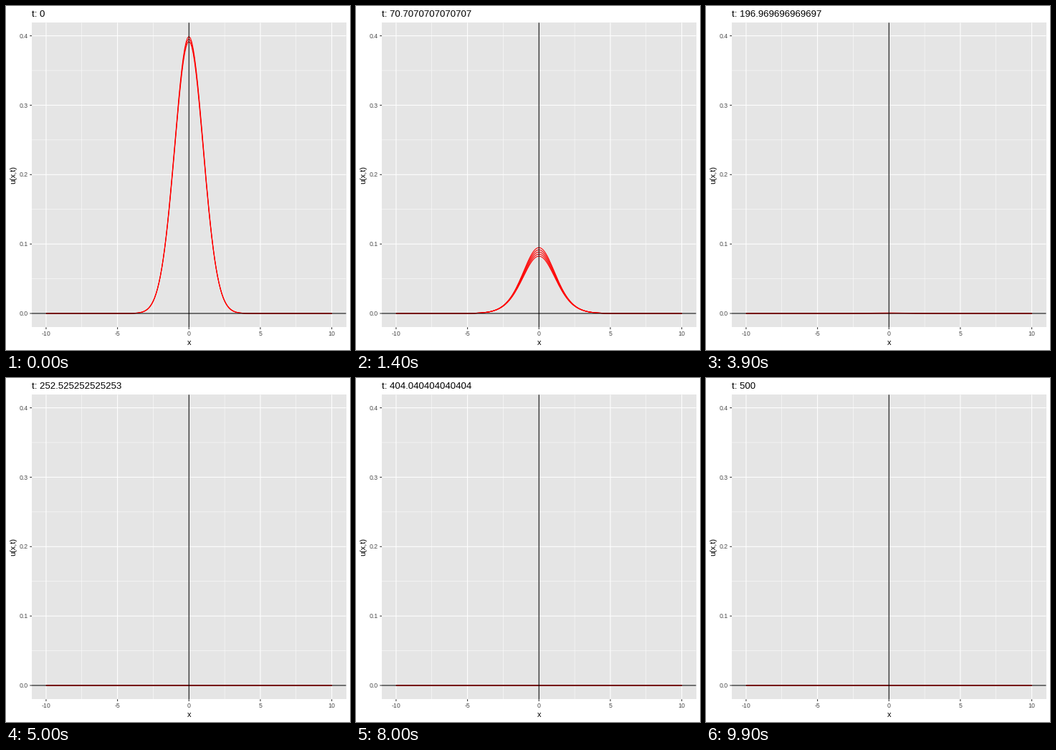
Recreate the animation shown at these times as a matplotlib script. Size 480 by 480 pixels, loop 10 s.

```python
import numpy as np
import matplotlib.pyplot as plt
from matplotlib.animation import FuncAnimation
from matplotlib.patches import Rectangle

plt.rcParams["font.family"] = "Liberation Sans"

SIZE, FRAMES, T_END = 480, 100, 500
PT = 0.75  # points per pixel at 96 dpi
LEFT, RIGHT, TOP, BOTTOM = 36.0, 474.5, 23.3, 448.3

# Bistable reaction-diffusion: u_t = D u_xx + K u (1 - u) (u - A)
D, K, A = 0.01, 0.1, 0.38
SUBSTEPS = 4


def solve():
    x = np.linspace(-10, 10, 201)
    dx = x[1] - x[0]
    u = np.exp(-x**2 / 2) / np.sqrt(2 * np.pi)
    rows = [u]
    for _ in range(T_END):
        for _ in range(SUBSTEPS):
            p = np.pad(u, 1, mode="edge")
            lap = (p[2:] - 2 * u + p[:-2]) / dx**2
            u = u + (D * lap + K * u * (1 - u) * (u - A)) / SUBSTEPS
        rows.append(u)
    return x, np.array(rows)


x, sol = solve()
peak = sol.max()


def px(v):
    return LEFT + (np.asarray(v) + 11) / 22 * (RIGHT - LEFT)


def py(v):
    return BOTTOM - (np.asarray(v) / peak + 0.05) / 1.1 * (BOTTOM - TOP)


fig = plt.figure(figsize=(5, 5), dpi=96, facecolor="white")
ax = fig.add_axes([0, 0, 1, 1])
ax.set_xlim(0, SIZE)
ax.set_ylim(SIZE, 0)
ax.axis("off")


def line(xs, ys, color, width, z):
    return ax.plot(xs, ys, color=color, lw=width * PT, zorder=z, snap=False,
                   solid_capstyle="butt", solid_joinstyle="round")[0]


def label(x0, y0, s, size, color="black", ha="center", **kw):
    return ax.text(x0, y0, s, fontsize=size * PT, color=color, ha=ha,
                   va="baseline", **kw)


def vline(v, color, width, z):
    line([px(v)] * 2, [TOP, BOTTOM], color, width, z)


def hline(v, color, width, z):
    line([LEFT, RIGHT], [py(v)] * 2, color, width, z)


ax.add_patch(Rectangle((LEFT, TOP), RIGHT - LEFT, BOTTOM - TOP,
                       fc="#e5e5e5", lw=0, zorder=0))

for v in (-7.5, -2.5, 2.5, 7.5):
    vline(v, "white", 0.53, 1)
for v in (0.05, 0.15, 0.25, 0.35):
    hline(v, "white", 0.53, 1)
for v in (-10, -5, 0, 5, 10):
    vline(v, "white", 1.07, 2)
    line([px(v)] * 2, [BOTTOM, BOTTOM + 2.75], "#333333", 1.07, 2)
    label(px(v), 460.2, str(v), 8.8, "#4d4d4d")
for v in (0, 0.1, 0.2, 0.3, 0.4):
    hline(v, "white", 1.07, 2)
    line([LEFT - 2.75, LEFT], [py(v)] * 2, "#333333", 1.07, 2)
    label(31, py(v) + 3.2, f"{v:.1f}", 8.8, "#4d4d4d", ha="right")

hline(0, "black", 1.07, 5)
vline(0, "black", 1.07, 5)

label(px(0), 472.8, "x", 11)
label(13.6, (TOP + BOTTOM) / 2, "u(x,t)", 11, rotation=90,
      rotation_mode="anchor")
title = label(35.5, 15, "", 13.2, ha="left")

# Every whole time step is shown in the frame nearest to it.
nearest = np.round(np.arange(T_END + 1) * (FRAMES - 1) / T_END).astype(int)
curves = [line([], [], "red", 1.07, 4)
          for _ in range(np.bincount(nearest).max())]


def update(i):
    title.set_text(f"t: {T_END * i / (FRAMES - 1):.15g}")
    steps = np.flatnonzero(nearest == i)
    for k, curve in enumerate(curves):
        if k < len(steps):
            curve.set_data(px(x), py(sol[steps[k]]))
        else:
            curve.set_data([], [])
    return [title, *curves]


anim = FuncAnimation(fig, update, frames=FRAMES, interval=100,
                     repeat=True, repeat_delay=0, blit=False)
plt.show()
```
